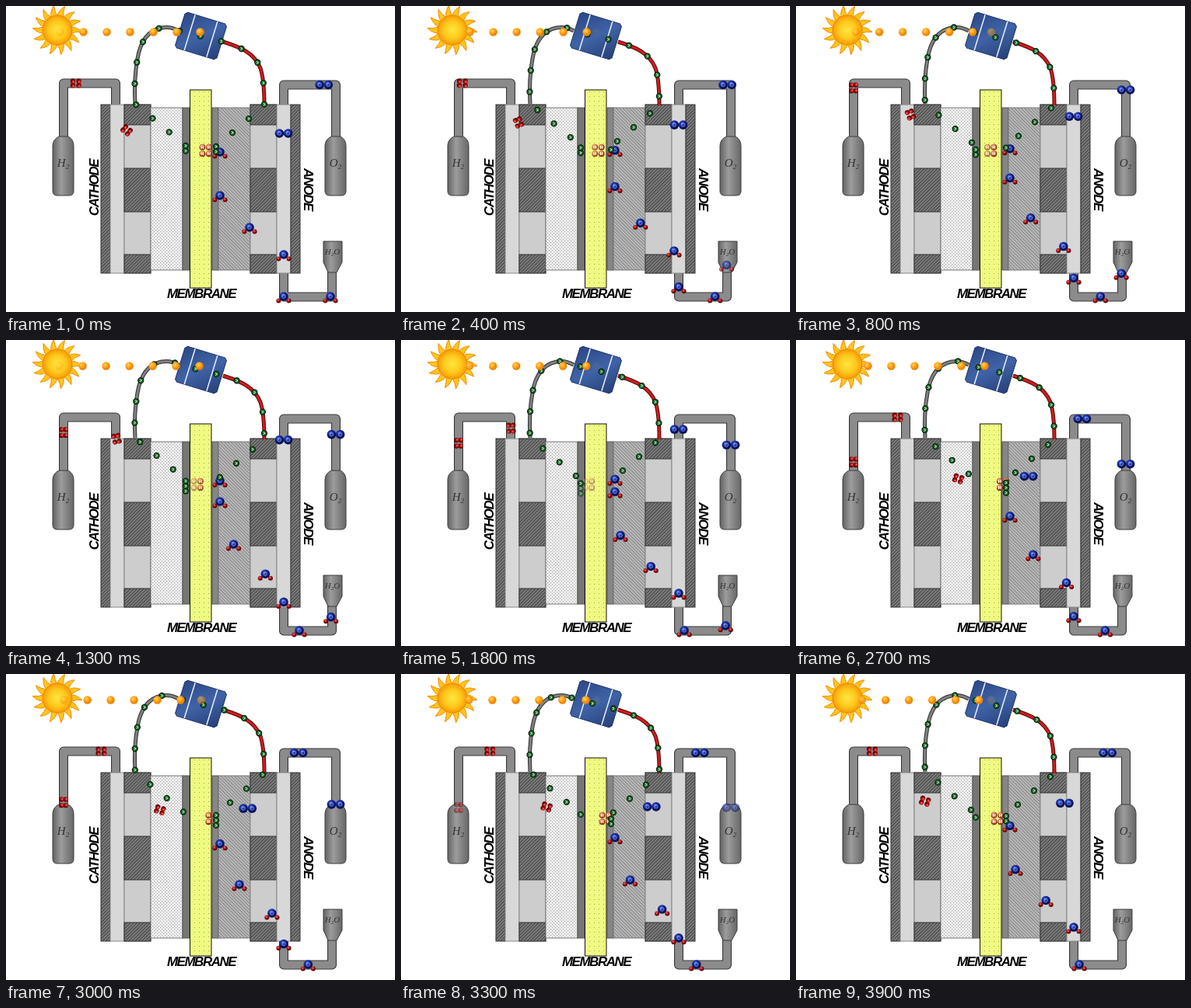
An HTML page that plays this animation: 500x394 px, repeating every 4000 ms.

```html
<!DOCTYPE html>
<html lang="en">
<head>
<meta charset="utf-8">
<title>Electrolyser cell</title>
<style>
html, body { margin: 0; width: 100%; height: 100%; overflow: hidden; background: #fff; }
svg { display: block; width: 500px; height: 394px; }
.name { font: italic bold 17px "Liberation Sans", Arial, sans-serif; letter-spacing: -1.5px; text-anchor: middle; }
.gas { font: italic 15px "Liberation Serif", Times, serif; text-anchor: middle; fill: #333; }
.ion { font: bold 6px "Liberation Sans", Arial, sans-serif; text-anchor: middle; fill: #fff; }
</style>
</head>
<body>
<svg viewBox="0 0 500 394">
  <defs>
    <path id="circuit"/>
    <pattern id="hatch" width="3" height="3" patternUnits="userSpaceOnUse" patternTransform="rotate(45)">
      <rect width="3" height="3" fill="#858585"/><rect width="1.3" height="3" fill="#444"/>
    </pattern>
    <pattern id="weave" width="3" height="3" patternUnits="userSpaceOnUse" patternTransform="rotate(-45)">
      <rect width="3" height="3" fill="#b9b9b9"/><rect width="1" height="3" fill="#858585"/>
    </pattern>
    <pattern id="mesh" width="4" height="4" patternUnits="userSpaceOnUse">
      <rect width="4" height="4" fill="#f3f3f3"/><path d="M0 0h1.2v1.2h-1.2zM2 2h1.2v1.2h-1.2z" fill="#a0a0a0"/>
    </pattern>
    <pattern id="specks" width="6" height="6" patternUnits="userSpaceOnUse">
      <rect width="6" height="6" fill="#effa82"/><path d="M2 2h1v1h-1z" fill="#a2ab4a"/>
    </pattern>
    <linearGradient id="steel">
      <stop offset="0" stop-color="#636363"/><stop offset=".4" stop-color="#9c9c9c"/><stop offset="1" stop-color="#676767"/>
    </linearGradient>
    <linearGradient id="cell" x2="1" y2="1">
      <stop offset="0" stop-color="#2c4785"/><stop offset=".5" stop-color="#3f63a6"/><stop offset="1" stop-color="#273f78"/>
    </linearGradient>
    <radialGradient id="face">
      <stop offset="0" stop-color="#ffe640"/><stop offset=".6" stop-color="#fdc81c"/><stop offset="1" stop-color="#f79a08"/>
    </radialGradient>
    <radialGradient id="photon" cx=".38" cy=".35">
      <stop offset="0" stop-color="#ffd35c"/><stop offset=".6" stop-color="#ffa51c"/><stop offset="1" stop-color="#ef8600"/>
    </radialGradient>
    <radialGradient id="oxy" cx=".4" cy=".35">
      <stop offset="0" stop-color="#6f8ce8"/><stop offset=".4" stop-color="#2038b4"/><stop offset="1" stop-color="#081258"/>
    </radialGradient>
    <radialGradient id="hyd" cx=".4" cy=".35">
      <stop offset="0" stop-color="#f07a70"/><stop offset=".5" stop-color="#c01818"/><stop offset="1" stop-color="#600606"/>
    </radialGradient>
    <radialGradient id="proton" cx=".4" cy=".35">
      <stop offset="0" stop-color="#f4b890"/><stop offset=".6" stop-color="#d4764a"/><stop offset="1" stop-color="#8c3418"/>
    </radialGradient>
  </defs>
  <g id="still"></g>
  <g id="moving"></g>
</svg>
<script>
const $ = id => document.getElementById(id);
const clamp = v => Math.min(1, Math.max(0, v));
const mix = (a, b, f) => a + (b - a) * f;

// a cycle is 42 beats long, of which 40 are shown; the cell reacts halfway
const CYCLE = 42, SHOWN = 40, HALF = 21;

const redWire = 'C332 108 331 92 327 80C319 60 301 53 279 46';
const greyWire = 'C212 26 205 27 200 28C184 31 173 44 169 68C165 90 165 110 166 126';
$('circuit').setAttribute('d', `M270 181L332 128${redWire}L222 32${greyWire}L231 180`);
const circuit = $('circuit'), circuitLength = circuit.getTotalLength();

function rect(x, y, w, h, fill, line = '#333') {
  return `<rect x="${x}" y="${y}" width="${w}" height="${h}" fill="${fill}" stroke="${line}"/>`;
}

function tube(d, inner, outer, wide, thin) {
  const p = (c, w) => `<path d="${d}" fill="none" stroke="${c}" stroke-width="${w}" stroke-linejoin="round"/>`;
  return p(outer, wide) + p(inner, thin);
}

function sun() {
  const rays = 14;
  const at = (r, a) => `${66 + r * Math.cos(a)} ${31 + r * Math.sin(a)}`;
  let d = '';
  for (let i = 0; i < rays; i++) {
    const a = i * 2 * Math.PI / rays;
    d += `M${at(18, a - .22)}Q${at(25, a - .18)} ${at(32, a + .08)}Q${at(24, a + .08)} ${at(18, a + .22)}Z`;
  }
  return `<path d="${d}" fill="#ffc61c" stroke="#f28a00"/>` +
    '<circle cx="66" cy="31" r="19" fill="url(#face)" stroke="#f08400"/>';
}

function bottle(dx, symbol) {
  return `<g transform="translate(${dx})">
    <path d="M68 168h12q7 4 7 12v58q0 6-6 6h-15q-6 0-6-6v-58q0-8 8-12z" fill="url(#steel)" stroke="#3c3c3c"/>
    <text class="gas" x="73.500" y="207">${symbol}<tspan font-size="9" dy="3">2</tspan></text></g>`;
}

function plate(x) {
  const block = (y, h) => rect(x, y, 34, h, 'url(#hatch)');
  return rect(x, 127, 34, 217, '#cdcdcd', '#888') + block(127, 26) + block(209, 56) + block(320, 24);
}

function panel() {
  return `<g transform="translate(250.500 38.500) rotate(17)">
    <path d="M-25-24H25L28-21V21L25 24H-25L-28 21V-21Z" fill="url(#cell)" stroke="#1f3566"/>
    <path d="M-15-24V24M15-24V24" stroke="#e8eefa" stroke-width="1.500"/></g>`;
}

function scene() {
  const pipe = d => tube(d, '#8b8b8b', '#383838', 12, 9.8);
  const name = (text, place) => `<text class="name" transform="${place}">${text}</text>`;
  return sun() +
    pipe('M74 172V99.500H141V128') + pipe('M357 128V101.500H424V172') + pipe('M419 340V374.500H357V343') +
    bottle(0, 'H') + bottle(350, 'O') +
    '<path d="M408 303h24v27l-7 13h-11l-6-13z" fill="url(#steel)" stroke="#3c3c3c"/>' +
    '<text class="gas" x="419.500" y="320" style="font-size:11px">H<tspan font-size="7" dy="2">2</tspan><tspan dy="-2">O</tspan></text>' +
    rect(122, 127, 12, 217, 'url(#hatch)') + rect(134, 127, 18, 217, '#d8d8d8', '#888') + plate(152) +
    rect(186, 131, 41, 209, 'url(#mesh)', '#777') + rect(227, 131, 9, 209, '#767676', '#555') +
    rect(265, 131, 8, 209, '#868686', '#555') + rect(273, 131, 41, 209, 'url(#weave)', '#777') +
    plate(314) + rect(348, 127, 18, 217, '#d8d8d8', '#888') + rect(366, 127, 12, 217, 'url(#hatch)') +
    rect(236.5, 108, 27.5, 255, 'url(#specks)', '#111') +
    tube('M222 32' + greyWire, '#808080', '#303030', 5, 3) +
    tube('M332 128' + redWire, '#d01c1c', '#4c0a0a', 5, 3) + panel() +
    name('CATHODE', 'translate(118.500 234) rotate(-90)') +
    name('ANODE', 'translate(383 236) rotate(90)') + name('MEMBRANE', 'translate(251 376)');
}

function ball(x, y, r, paint, alpha = 1) {
  return `<circle cx="${x}" cy="${y}" r="${r}" fill="url(#${paint})" opacity="${alpha}"/>`;
}

const oxygen = (x, y, a) => ball(x, y, 5.8, 'oxy', a) +
  `<circle cx="${x}" cy="${y}" r="2.2" fill="none" stroke="#a9bcf5" stroke-width=".8" opacity="${a * .8}"/>`;

// one leg per half cycle: x, y, and how early (+) or late (-) the leg's pace is
const waterWay = [[419, 322, .2], [417, 374, .2], [357, 374, .25], [357, 320, -.35],
  [313, 285, -.35], [275, 244, .1], [275, 188, .2], [275, 178]];

function water(t) {
  let s = '';
  for (let n = 0; n < 7; n++) {
    const age = t + n * HALF;
    if (age < 3 || n === 5 && t >= HALF) continue;
    const leg = Math.floor(age / HALF), f = age / HALF - leg;
    if (leg > 6 || leg === 6 && n === 5) continue;
    const a = waterWay[leg], b = waterWay[leg + 1];
    const pace = f + a[2] * f * (1 - f), alpha = clamp((age - 2) / 3);
    const x = mix(a[0], b[0], pace), y = mix(a[1], b[1], pace);
    s += ball(x - 6.6, y + 5.5, 3, 'hyd', alpha) + ball(x + 6.6, y + 5.5, 3, 'hyd', alpha) + oxygen(x, y, alpha);
  }
  return s;
}

// the first leg takes half a cycle, then the gas keeps one speed through the pipe
function gasAt(way, age) {
  const first = clamp((age - HALF) / HALF);
  let i = 0, f = first;
  if (age > CYCLE) {
    let left = (age - CYCLE) * 2.72;
    for (i = 1; i < way.length - 1; i++) {
      const size = Math.hypot(way[i + 1][0] - way[i][0], way[i + 1][1] - way[i][1]);
      f = Math.min(1, left / size);
      if (left <= size) break;
      left -= size;
    }
    i = Math.min(i, way.length - 2);
  }
  return [0, 1].map(k => mix(way[i][k], way[i + 1][k], f));
}

function gas(t, way, shape) {
  let s = '';
  for (let age = t; age < 120; age += CYCLE) {
    const alpha = clamp((age - 18) / 4) * clamp((120 - age) / 6);
    if (!alpha) continue;
    const [x, y] = gasAt(way, age), [x0, y0] = gasAt(way, age - 1.5), [x1, y1] = gasAt(way, age + 1.5);
    const turn = Math.atan2(y1 - y0, x1 - x0) * 180 / Math.PI;
    s += shape(x, y, alpha, turn);
  }
  return s;
}

const corners = [[-1, -1], [1, -1], [-1, 1], [1, 1]];
const hydrogenWay = [[230, 186], [155, 160], [142, 127], [141, 99.5], [74, 99.5], [74, 172]];
const oxygenWay = [[276, 180], [357, 164], [357, 101.5], [424, 101.5], [424, 172]];

const hydrogenPair = (x, y, a, turn) =>
  `<g transform="translate(${x} ${y}) rotate(${turn})" opacity="${a}">` +
  corners.map(([i, j]) => ball(i * 3.8, j * 2.8, 3.2, 'hyd')).join('') + '</g>';
const oxygenPair = (x, y, a) => oxygen(x - 5.6, y, a) + oxygen(x + 5.6, y, a);

function protons(t) {
  const age = (t + HALF) % CYCLE, x = 268 - 30 * (age / CYCLE) ** 1.4;
  return corners.map(([i, j]) => {
    const px = x + i * 4.2, py = 186 + j * 4.2;
    const a = clamp((px - 228) / 26) * clamp((age + 1) / 3) * clamp((CYCLE - age) / 4);
    return `<g opacity="${a}">${ball(px, py, 4, 'proton')}<text class="ion" x="${px}" y="${py + 2}">H</text></g>`;
  }).join('');
}

// 17 even steps round the circuit; electrons queue before it and after it
const STEPS = 17, QUEUE = 6.5;

function spot(u) {
  const p = circuit.getPointAtLength(clamp(u / STEPS) * circuitLength);
  return [p.x, p.y + QUEUE * (Math.max(0, -u) + Math.max(0, u - STEPS))];
}

function electrons(t) {
  const phase = (t + HALF) % CYCLE * 4 / CYCLE;
  let s = '';
  for (let batch = 0; batch < 5; batch++) {
    for (let j = 0; j < 4; j++) {
      const u = phase + batch * 4 - j, [x, y] = spot(u);
      const a = u > STEPS + 1 ? clamp((4 - phase) * 2) : 1;
      s += `<g transform="translate(${x} ${y})" opacity="${a}"><circle r="3.500" fill="#226b30" stroke="#08260e" stroke-width="1.300"/>` +
        '<path d="M-1.200-1.600L1.200 0L-1.200 1.600" fill="none" stroke="#d9f5d9"/></g>';
    }
  }
  return s;
}

function photons(t) {
  const turn = t / CYCLE;
  const shift = (turn * 6 + .05 + .12 * Math.sin(turn * 2 * Math.PI)) % 1;
  let s = '';
  for (let k = -1; k < 6; k++) {
    const x = 98 + (shift + k) * 30;
    const a = x > 253 ? clamp((270 - x) / 30) : clamp((x - 62) / 30);
    s += ball(Math.min(x, 251), 33.5, 5.2, 'photon', a);
  }
  return s;
}

function draw(t) {
  $('moving').innerHTML = water(t) + gas(t, oxygenWay, oxygenPair) + protons(t) +
    gas(t, hydrogenWay, hydrogenPair) + electrons(t) + photons(t);
}

$('still').innerHTML = scene();
const start = performance.now();
let last = -1;
function tick() {
  const t = Math.floor((performance.now() - start) / 100) % SHOWN;
  if (t !== last) draw(last = t);
  requestAnimationFrame(tick);
}
tick();
</script>
</body>
</html>
```
